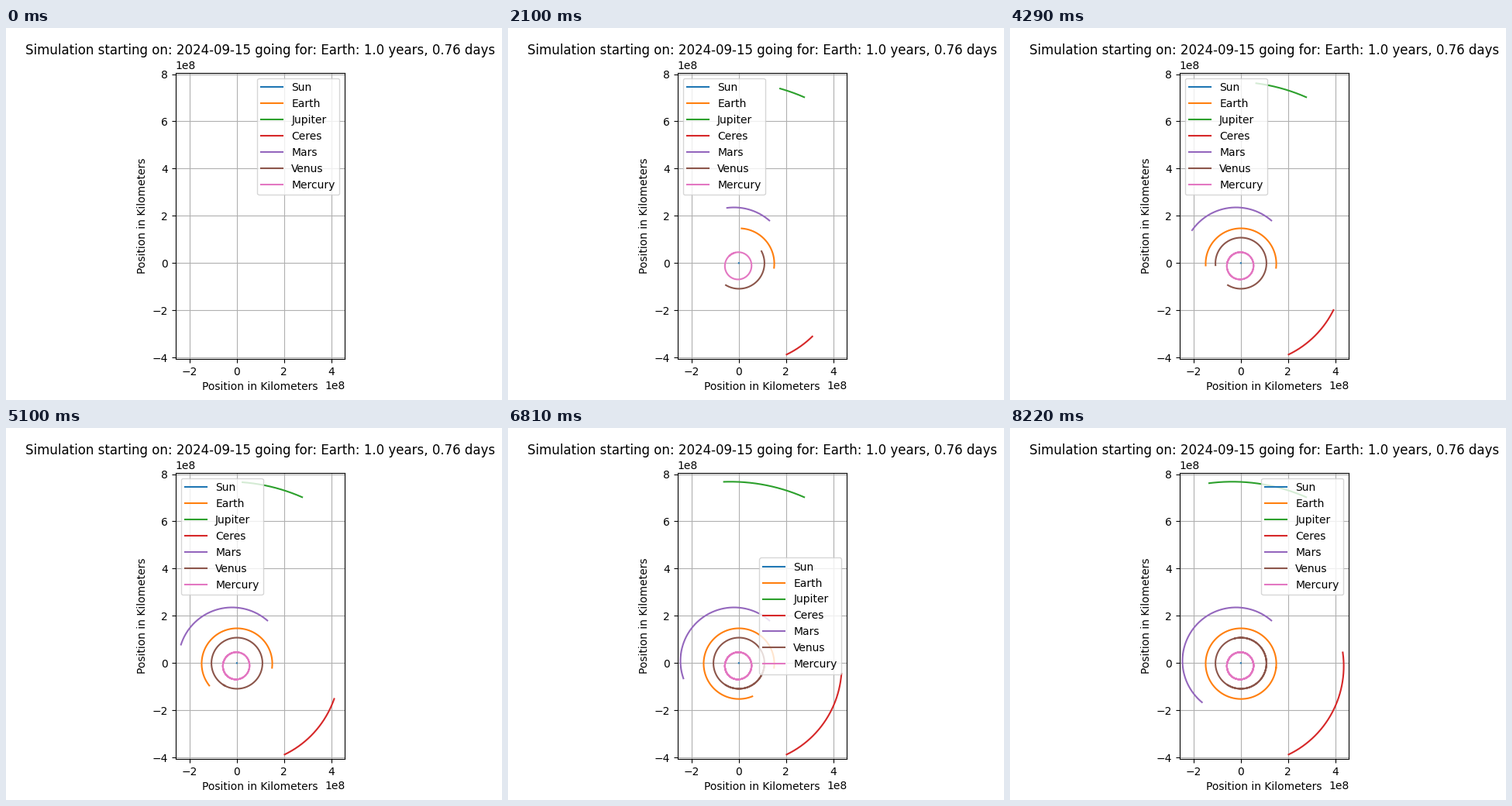
Animation of 640 by 480 pixels, one loop 8250 ms. Source, as a matplotlib script:

```python
import numpy as np
import matplotlib.pyplot as plt
from matplotlib.animation import FuncAnimation

AU = 1.495978707e8  # km
DAYS = 366
STEP = 32  # simulated hours per frame
FRAMES = 275

# a (AU), e, inclination, node, longitude of perihelion, mean anomaly at start
ORBITS = {
    "Earth": (1.00000261, 0.016707, 0.0, 0.0, 103.0176, 251.0909),
    "Jupiter": (5.202858, 0.048354, 1.3039, 100.5245, 14.7810, 49.3494),
    "Ceres": (2.767254, 0.078912, 10.5869, 80.2550, 153.6768, 138.8700),
    "Mars": (1.523715, 0.093414, 1.8477, 49.4873, -23.8338, 67.8916),
    "Venus": (0.723337, 0.006766, 3.3945, 76.6112, 131.6031, 107.2005),
    "Mercury": (0.387099, 0.205641, 7.0035, 48.2998, 77.4974, 21.9720),
}
CORNERS = ["upper right", "upper left", "lower left", "lower right", "right",
           "center left", "center right", "lower center", "upper center",
           "center"]

days = np.arange(DAYS * 24) / 24


def orbit(a, e, inc, node, peri, m0):
    """Ecliptic x, y of a Kepler orbit for every simulated hour."""
    inc, node, peri, m0 = np.radians([inc, node, peri, m0])
    m = m0 + np.radians(0.98560767) * a ** -1.5 * days
    ecc = m.copy()
    for _ in range(8):
        ecc -= (ecc - e * np.sin(ecc) - m) / (1 - e * np.cos(ecc))
    px = a * (np.cos(ecc) - e)
    py = a * np.sqrt(1 - e * e) * np.sin(ecc)
    w = peri - node
    u = px * np.cos(w) - py * np.sin(w)
    v = (px * np.sin(w) + py * np.cos(w)) * np.cos(inc)
    x = u * np.cos(node) - v * np.sin(node)
    y = u * np.sin(node) + v * np.cos(node)
    return AU * np.column_stack([x, y])


# The Sun is only tugged slightly towards Jupiter.
tracks = {"Sun": 1.1e5 * (days[:, None] / DAYS) ** 2 * np.array([0.15, 0.95])}
tracks.update((name, orbit(*el)) for name, el in ORBITS.items())

fig, ax = plt.subplots(figsize=(6.4, 4.8), dpi=100)
lines = [ax.plot([], [], label=name)[0] for name in tracks]
points = np.concatenate(list(tracks.values()))
low, high = 1.05 * points.min(axis=0), 1.05 * points.max(axis=0)
ax.set_xlim(low[0], high[0])
ax.set_ylim(low[1], high[1])
ax.set_aspect("equal")
ax.grid(True)
ax.set_xlabel("Position in Kilometers")
ax.set_ylabel("Position in Kilometers")
ax.set_title("Simulation starting on: 2024-09-15 going for: "
             "Earth: 1.0 years, 0.76 days")
legend = ax.legend(loc="upper right")
fig.canvas.draw()
pixels = [ax.transData.transform(xy) for xy in tracks.values()]


def crowding(loc):
    """Track points hidden by the legend at loc, for each frame."""
    legend.set_loc(loc)
    box = legend.get_window_extent()
    total = np.zeros(FRAMES)
    for p in pixels:
        inside = np.all((p > box.min) & (p < box.max), axis=1)
        count = np.concatenate([[0], np.cumsum(inside)])
        hidden = count[STEP * np.arange(FRAMES)]
        total += hidden + (hidden > 0)
    return total


best = np.argmin([crowding(loc) for loc in CORNERS], axis=0)


def update(i):
    for line, xy in zip(lines, tracks.values()):
        line.set_data(*xy[:i * STEP].T)
    legend.set_loc(CORNERS[best[i]])
    return lines


anim = FuncAnimation(fig, update, frames=FRAMES, interval=30, repeat=True)
plt.show()
```
